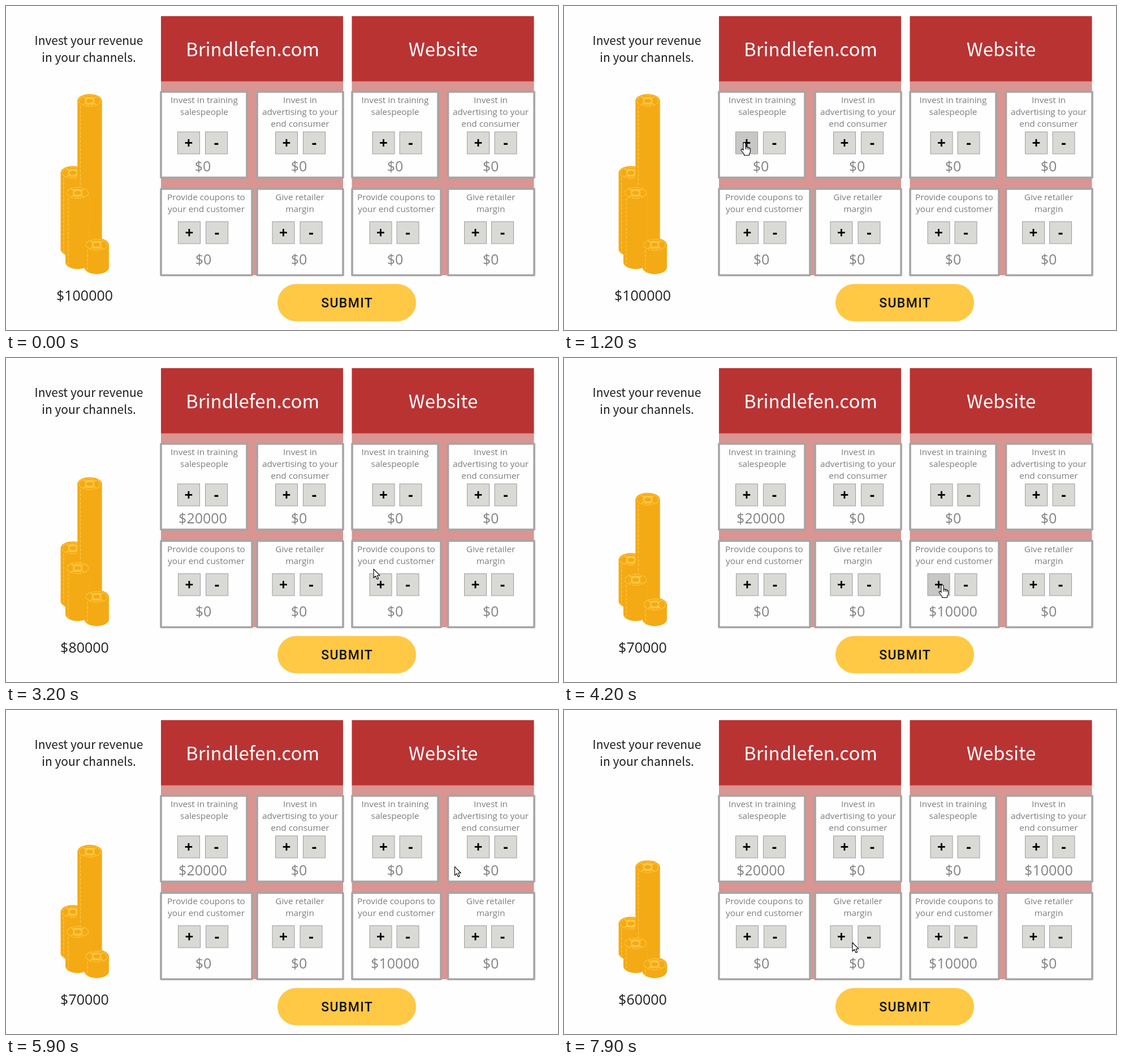
Animation of 976x574 px, one loop 8 s. Source, as an HTML page:

```html
<!DOCTYPE html>
<html lang="en">
<head>
<meta charset="utf-8">
<title>Invest your revenue</title>
<style>
html, body { margin: 0; width: 100%; height: 100%; overflow: hidden; background: #fefefe; }
svg { display: block; }
text { text-anchor: middle; white-space: pre; }
.title { font: 33px "Noto Sans CJK JP", "Noto Sans CJK", "Noto Sans", sans-serif; fill: #fff; }
.intro { font: 21px "Noto Sans CJK JP", "Noto Sans CJK", "Noto Sans", sans-serif; fill: #1c1c1c; }
.label { font: 15.35px "Open Sans", sans-serif; fill: #7d7d7d; }
.value { font: 25px "Open Sans", sans-serif; fill: #838383; }
.total { font: 25px "Open Sans", sans-serif; fill: #222; }
.sign { font: bold 26px "Open Sans", sans-serif; fill: #000; }
.submit { font: 500 23px Roboto, sans-serif; letter-spacing: 1.4px; fill: #111; }
</style>
</head>
<body>
<svg id="stage" width="976" height="574" viewBox="0 0 976 574"></svg>
<script>
const LOOP = 8000, STEP = 100;
const GOLD = '#f4aa14', LIGHT = '#ffc845', KEY = '#d9d9d5';
const stage = document.getElementById('stage');

function add(tag, attrs, parent = stage) {
  const el = document.createElementNS('http://www.w3.org/2000/svg', tag);
  for (const k in attrs) el.setAttribute(k, attrs[k]);
  parent.appendChild(el);
  return el;
}
function box(x, y, width, height, fill, more) {
  return add('rect', { x, y, width, height, fill, ...more });
}
function write(cls, x, y, str) {
  const el = add('text', { class: cls, x, y });
  el.textContent = str;
  return el;
}

// Panels
write('intro', 146.5, 69, 'Invest your revenue');
write('intro', 146.5, 99, 'in your channels.');
[[274, 436, 'Brindlefen.com'], [611.5, 773, 'Website']].forEach(([x, mid, name]) => {
  box(x, 133, 322, 344, '#d99591');
  box(x, 18, 322, 115.5, '#ba3333');
  write('title', mid, 88.5, name);
});

// Cards: left, width, label centre, value centre, plus left, minus left
const train = ['Invest in training', 'salespeople'];
const ads = ['Invest in', 'advertising to your', 'end consumer'];
const coupons = ['Provide coupons to', 'your end customer'];
const margin = ['Give retailer', 'margin'];
const rows = [
  { y: 152, h: 152, base: 172, key: 223, val: 292.5, cards: [
    [274, 152, 350.5, 348, 303.5, 352.5, train],
    [444, 152, 520, 518, 476.5, 525.5, ads],
    [612, 152, 688, 688, 648, 696, train],
    [781.5, 152.5, 857, 857, 815.5, 864, ads]] },
  { y: 324, h: 153, base: 344, key: 382, val: 457.5, cards: [
    [274, 161, 354, 349, 304.5, 353.5, coupons],
    [444, 152, 519.5, 518, 471, 520, margin],
    [612, 157, 690, 688, 643, 691, coupons],
    [781.5, 152.5, 857, 857, 810.5, 858.5, margin]] }
];
const plus = [], values = [], keys = [];

function addKey(x, y, sign) {
  const el = box(x, y, 39, 39, KEY, { stroke: '#9c9c9c' });
  write('sign', x + 19.5, y + 29, sign);
  keys.push([x, y]);
  return el;
}
for (const r of rows) {
  for (const [x, w, labelX, valueX, plusX, minusX, lines] of r.cards) {
    box(x, r.y, w, r.h, '#fefefe', { stroke: '#a5a5a5', 'stroke-width': 3.6, 'stroke-linejoin': 'round' });
    lines.forEach((s, i) => write('label', labelX, r.base + 21 * i, s));
    plus.push(addKey(plusX, r.key, '+'));
    addKey(minusX, r.key, '-');
    values.push(write('value', valueX, r.val, '$0'));
  }
}
box(480, 492.5, 245, 66, LIGHT, { rx: 33 });
write('submit', 603.2, 533.5, 'SUBMIT');
const total = write('total', 139, 522, '');

// Coin stacks
function makeStack(cx, bottom, topAt) {
  const side = add('path', { fill: GOLD });
  const dash = { fill: 'none', stroke: LIGHT, 'stroke-dasharray': '5 2.5' };
  const seam = add('path', { ...dash, 'stroke-width': 1.2 });
  const edge = add('path', { ...dash, 'stroke-width': 0.8, 'stroke-dasharray': '1.5 5' });
  const lid = add('g', {});
  const oval = (rx, ry, more) => add('ellipse', { rx, ry, fill: 'none', stroke: LIGHT, ...more }, lid);
  oval(21.7, 12, { fill: GOLD, stroke: 'none' });
  oval(19, 9.8, { 'stroke-width': 1.1, 'stroke-dasharray': '14 2' });
  oval(7.5, 4.7, { 'stroke-width': 2.2 });
  add('path', { d: 'M-11 -6.5L-6 -3.5M11 -6.5L6 -3.5M-11 6.5L-6 3.5M11 6.5L6 3.5M-7 -6H7M-7 6H7',
    stroke: LIGHT, 'stroke-width': 1.7, fill: 'none' }, lid);
  return spent => {
    const top = topAt(spent), l = cx - 21.7, r = cx + 21.7;
    side.setAttribute('d', `M${l} ${top}V${bottom}A21.7 12 0 0 0 ${r} ${bottom}V${top}Z`);
    seam.setAttribute('d', `M${cx - 16.5} ${top + 9}V${bottom + 7}`);
    edge.setAttribute('d', `M${r - 1} ${top + 4}V${bottom}`);
    lid.setAttribute('transform', `translate(${cx} ${top})`);
  };
}
const stacks = [
  makeStack(118.3, 431, n => 295.5 + 20.7 * n),
  makeStack(148, 438, n => 168 + 27.6 * n),
  makeStack(126.7, 454, n => 331 + 20.6 * n),
  makeStack(160.3, 463, n => 423 + 13.7 * Math.max(0, n - 2))
];

// Pointer
const ink = { fill: '#fff', stroke: '#000', 'stroke-width': 1.1, 'stroke-linejoin': 'round' };
const arrow = add('path', { ...ink, d: 'M0 0V15.5L3.5 12.2 6 18 8.6 17 6.2 11.2H10.8Z' });
const hand = add('path', { ...ink, d: 'M-2 2Q-2 0 0 0Q2 0 2 2V8Q4.5 6.5 5 8.5Q7.5 7.5 8 9.5Q10.5 9 10.5 11.5V15' +
  'Q10.5 18 8.5 20V22.5H-.5V20.5L-5.5 14Q-6.5 12 -4.8 11.4Q-3.5 11.2 -2 13.5ZM2 8V12M5 8.5V12M8 9.5V12.5' });

const path = [ // time, x, y
  [600, 500, 400], [1100, 319, 242], [2700, 319, 242], [3200, 650, 374], [3500, 669, 402],
  [5200, 669, 402], [6100, 829, 242], [7400, 829, 242], [7900, 510, 412]
];
const clicks = [[1600, 0], [2300, 0], [4200, 6], [7000, 3]]; // time, card
const hovers = [[1100, 2800, 0], [3500, 5000, 6], [6100, 7500, 3]]; // from, to, card

function pointerAt(t) {
  let i = 0;
  while (i < path.length - 2 && path[i + 1][0] <= t) i++;
  const [t0, x0, y0] = path[i], [t1, x1, y1] = path[i + 1];
  const p = Math.min(1, Math.max(0, (t - t0) / (t1 - t0)));
  return [x0 + (x1 - x0) * p, y0 + (y1 - y0) * p];
}

function draw(t) {
  const sums = values.map(() => 0);
  const done = clicks.filter(c => t >= c[0]);
  done.forEach(c => sums[c[1]]++);
  values.forEach((el, i) => el.textContent = '$' + sums[i] * 10000);
  total.textContent = '$' + (100000 - done.length * 10000);
  stacks.forEach(set => set(done.length));

  const hover = hovers.find(h => t >= h[0] && t < h[1]);
  const pressed = clicks.some(c => t >= c[0] - 200 && t < c[0]);
  plus.forEach((el, i) =>
    el.setAttribute('fill', hover && hover[2] === i ? (pressed ? '#b9b9b8' : '#c7c7c5') : KEY));

  const [x, y] = pointerAt(t);
  const over = keys.some(([kx, ky]) => x >= kx && x < kx + 39 && y >= ky && y < ky + 39);
  const shown = t >= path[0][0];
  [[arrow, !over], [hand, over]].forEach(([el, on]) => {
    el.setAttribute('transform', `translate(${x} ${y})`);
    el.setAttribute('visibility', shown && on ? 'visible' : 'hidden');
  });
}

const start = performance.now();
function tick() {
  const t = (performance.now() - start) % LOOP;
  draw(Math.floor(t / STEP) * STEP);
  requestAnimationFrame(tick);
}
tick();
</script>
</body>
</html>
```
